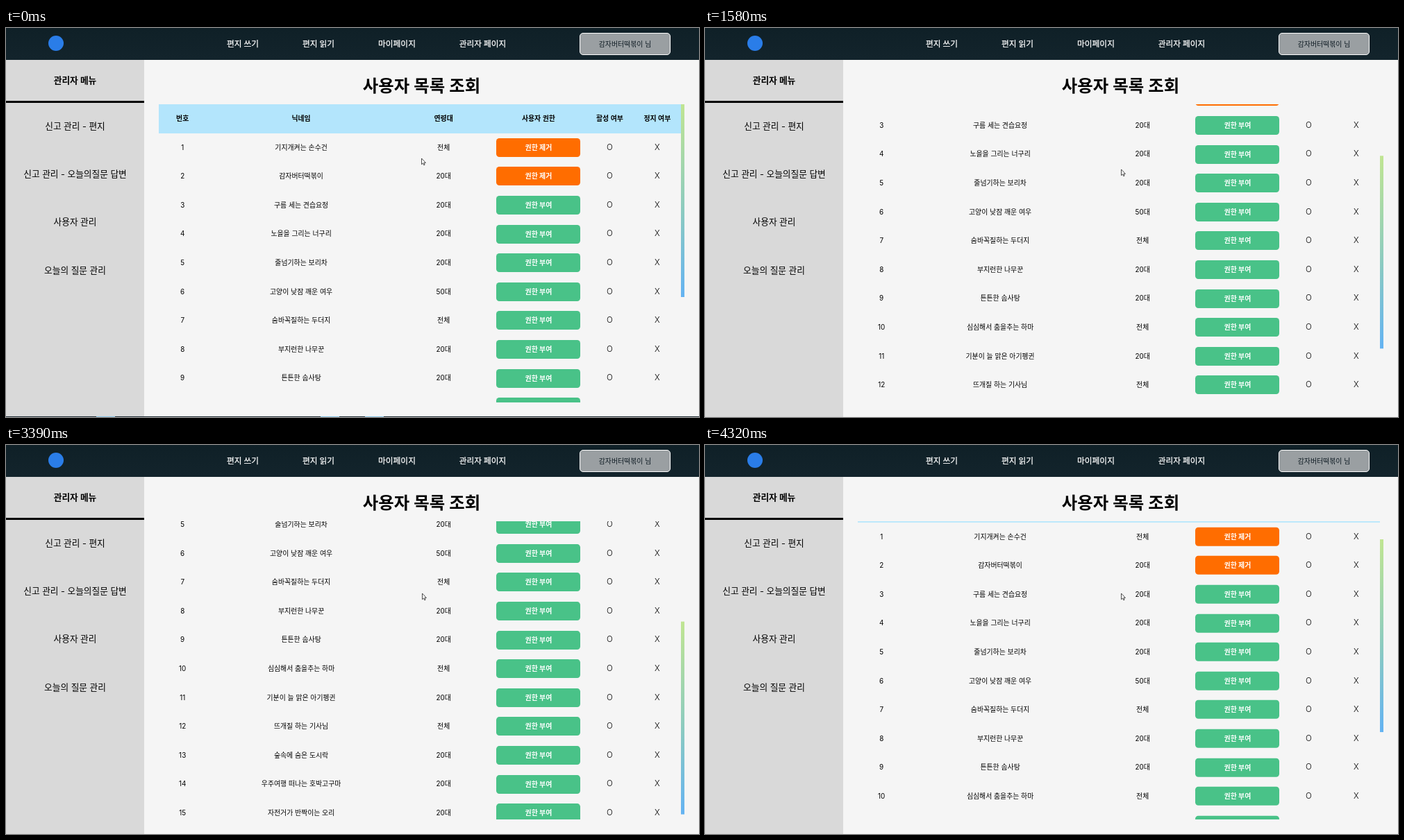
Write an HTML page that moves like this. It is 998 by 561 pixels and loops after 4850 ms.

```html
<!DOCTYPE html>
<html lang="ko">
<head>
<meta charset="utf-8">
<style>
  html, body { margin: 0; width: 100%; height: 100%; overflow: hidden; }
  body { position: relative; background: #f5f5f5; color: #000;
         font: 9.9px/20px Inter, "Noto Sans CJK KR", "Noto Sans CJK", sans-serif; }
  .abs, .label { position: absolute; }
  .label { transform: translate(-50%, -50%); white-space: nowrap; }
  #top { left: 0; top: 0; width: 998px; height: 46px; background: linear-gradient(#0f2027, #13242c); }
  #logo { left: 61px; top: 11px; width: 22px; height: 22px; border-radius: 50%; background: #2a7de8; }
  #user { left: 826px; top: 7px; width: 129px; height: 30px; border: 1px solid #fff; border-radius: 5px;
          background: #9a9fa2; text-align: center; line-height: 31px; color: #0d1a22; }
  #side { left: 0; top: 46px; width: 199px; height: 515px; background: #d9d9d9; }
  #rule { left: 0; top: 105px; width: 199px; height: 3px; background: #000; }
  .nav { color: #fff; font-size: 11.7px; font-weight: 500; -webkit-text-stroke: .25px #fff; }
  .menu { font-size: 12.7px; }
  .title { font-size: 24.4px; font-weight: 600; }
  .strong { font-weight: 600; }
  #list { left: 220px; top: 110px; width: 757px; height: 430px; overflow: hidden; }
  #rows { width: 752px; }
  .row { display: grid; grid-template-columns: 1fr 4fr 2fr 2fr 1fr 1fr; height: 41.6px; line-height: 41.6px;
         text-align: center; white-space: nowrap; }
  .head { background: #b3e5fc; font-weight: 600; }
  .mark { font-size: 11.5px; font-weight: 300; }
  .btn { width: 121px; height: 27px; margin: 7.3px auto; border-radius: 4.5px; line-height: 27px;
         background: #49c288; color: #fff; font-weight: 700; }
  .btn.off { background: #ff6d00; }
  #thumb { right: 0; top: 0; width: 5px; height: 278px;
           background: linear-gradient(#c0e592, #8ccbc0 55%, #64b3f2); }
  #task { left: 0; top: 560px; width: 998px; height: 1px; background: #25323a; }
  #task i { position: absolute; width: 27px; height: 1px; background: #8cc8ea; }
  #cursor { left: 0; top: 0; }
</style>
</head>
<body>
<div id="top" class="abs"></div>
<div id="logo" class="abs"></div>
<div id="user" class="abs">감자버터떡볶이 님</div>
<div id="side" class="abs"></div>
<div id="rule" class="abs"></div>
<div id="list" class="abs">
  <div id="rows"></div>
  <div id="thumb" class="abs"></div>
</div>
<div id="task" class="abs"><i style="left:130px"></i><i style="left:453px"></i><i style="left:517px"></i></div>
<svg id="cursor" class="abs" width="9" height="13">
  <path d="M.5 .5V9.2L2.5 7.4 3.8 10.3 5.1 9.7 3.9 6.9H6.4Z" fill="#fff" stroke="#222" stroke-width=".8"/>
</svg>
<script>
const $ = id => document.getElementById(id);

function add(parent, className, text = '') {
  const el = document.createElement('div');
  el.className = className;
  el.textContent = text;
  return parent.appendChild(el);
}

function label(text, x, y, style) {
  const el = add(document.body, 'label ' + style, text);
  el.style.left = x + 'px';
  el.style.top = y + 'px';
}

[['편지 쓰기', 341], ['편지 읽기', 450], ['마이페이지', 563], ['관리자 페이지', 686.5]]
  .forEach(([text, x]) => label(text, x, 23, 'nav'));
label('관리자 메뉴', 99.5, 76, 'menu strong');
['신고 관리 - 편지', '신고 관리 - 오늘의질문 답변', '사용자 관리', '오늘의 질문 관리']
  .forEach((text, i) => label(text, 99.5, 142 + i * 69.2, 'menu'));
label('사용자 목록 조회', 598.5, 83, 'title');

const names = ['기지개켜는 손수건', '감자버터떡볶이', '구름 세는 견습요정', '노을을 그리는 너구리',
  '줄넘기하는 보리차', '고양이 낮잠 깨운 여우', '숨바꼭질하는 두더지', '부지런한 나무꾼',
  '튼튼한 솜사탕', '심심해서 춤을추는 하마', '기분이 늘 맑은 아기펭귄', '뜨개질 하는 기사님',
  '숲속에 숨은 도시락', '우주여행 떠나는 호박고구마', '자전거가 반짝이는 오리'];
const ages = { 1: '전체', 6: '50대', 7: '전체', 10: '전체', 12: '전체' };

const head = add($('rows'), 'row head');
['번호', '닉네임', '연령대', '사용자 권한', '활성 여부', '정지 여부'].forEach(text => add(head, '', text));
names.forEach((name, i) => {
  const row = add($('rows'), 'row'), n = i + 1, admin = n < 3;
  [n, name, ages[n] || '20대'].forEach(text => add(row, '', text));
  add(row, admin ? 'btn off' : 'btn', admin ? '권한 제거' : '권한 부여');
  add(row, 'mark', 'O');
  add(row, 'mark', 'X');
});

const LOOP = 4850, VIEW = 430, CONTENT = 41.6 * 16, NOTCH = 65, GLIDE = 180;
// Wheel notches: start time and distance
const notches = [
  [1049, NOTCH], [1456, NOTCH], [1863, NOTCH], [2258, 40.3],
  [3336, -NOTCH], [3712, -NOTCH], [4134, -NOTCH]
];
// Pointer tip: time, x, y
const path = [[0, 598, 187.5], [260, 598.6, 190], [720, 598.6, 190], [1250, 599, 197.5],
  [1976, 599, 210.5], [2438, 599, 213.5], [LOOP, 599, 213.5]];

const clamp = v => Math.min(1, Math.max(0, v));
const smooth = u => u * u * (3 - 2 * u);

// The picture refreshes about 15 times a second
function hold(t) {
  const [start, step] = t < 3384 ? [-4, 66] : [3384, 66.5];
  return start + Math.floor((t - start) / step) * step;
}

function pointer(t) {
  const i = Math.max(1, path.findIndex(p => p[0] > t));
  const [a, b] = [path[i - 1], path[i]];
  const u = clamp((t - a[0]) / (b[0] - a[0]));
  return [1, 2].map(k => a[k] + (b[k] - a[k]) * u);
}

function draw(now) {
  const time = now % LOOP, t = hold(time);
  const scroll = notches.reduce((sum, [at, dist]) => sum + dist * smooth(clamp((t - at) / GLIDE)), 0);
  const [x, y] = pointer(t);
  $('rows').style.transform = `translateY(${-scroll}px)`;
  $('thumb').style.transform = `translateY(${scroll * VIEW / CONTENT}px)`;
  $('cursor').style.transform = `translate(${x}px, ${y}px)`;
  $('task').style.visibility = time < 70 ? 'visible' : 'hidden';
}

const begin = performance.now();
function tick() {
  draw(performance.now() - begin);
  requestAnimationFrame(tick);
}
tick();
</script>
</body>
</html>
```
